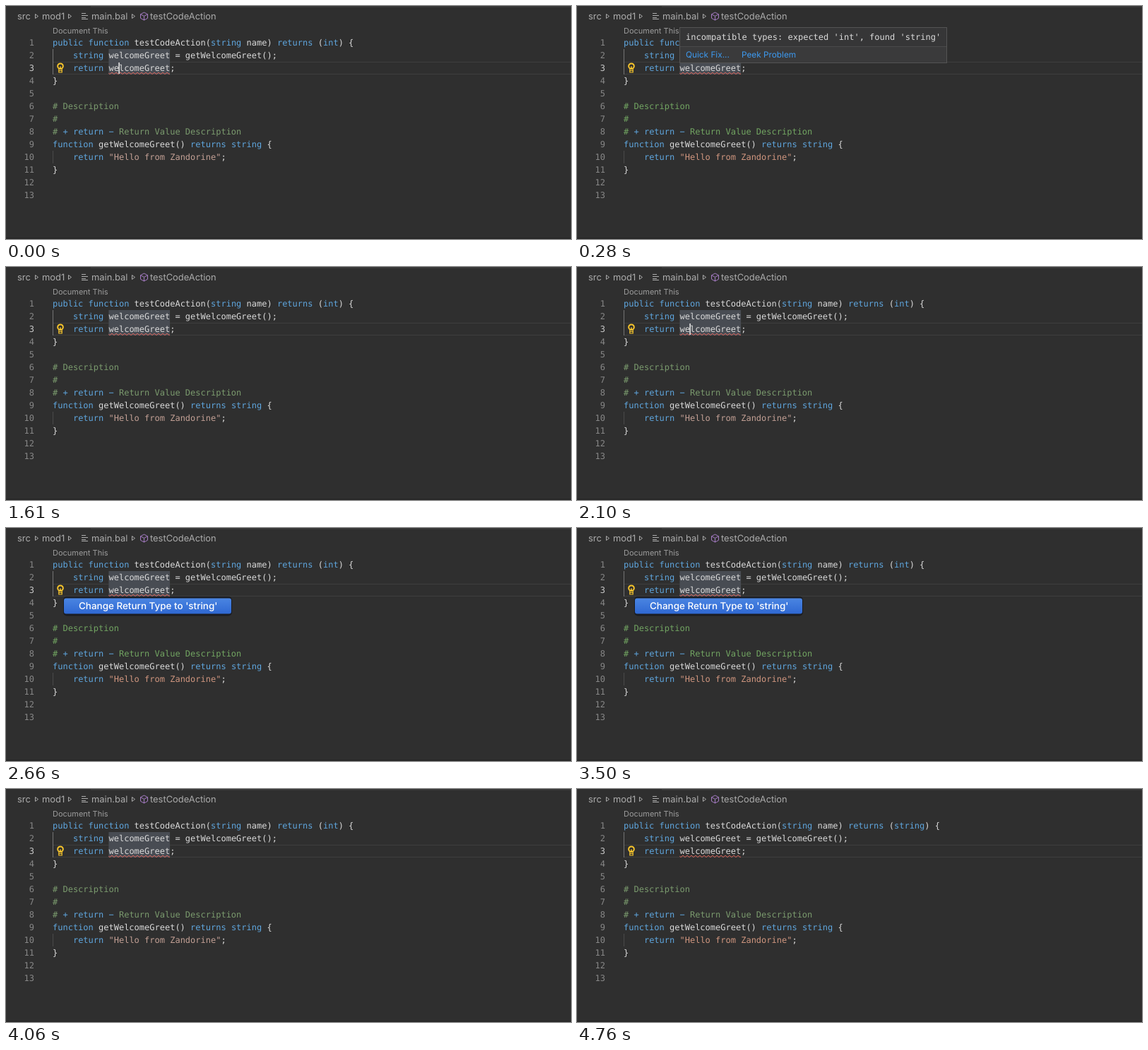
These frames come from a looping animation (800x330 px, 4.83 s). An HTML page:

```html
<!DOCTYPE html>
<html lang="en">
<head>
<meta charset="utf-8">
<title>Code action</title>
<style>
  html, body { margin: 0; width: 800px; height: 330px; overflow: hidden; background: #2f2f2f; }
  svg { display: block; }
  text { white-space: pre; text-rendering: geometricPrecision; }
  .code { font: 12px "DejaVu Sans Mono", monospace; fill: #dadada; }
  .num { font: 12px "DejaVu Sans Mono", monospace; fill: #878787; text-anchor: end; }
  .num.active { fill: #cacaca; }
  .ui { font-family: Inter, sans-serif; fill: #acacac; }
  .crumb { font-size: 12.9px; }
  .lens { font-size: 11px; fill: #9c9c9c; }
  .link { font-size: 11.8px; fill: #3d9af0; }
  .item { font-size: 13.45px; font-weight: 500; fill: #fff; }
  .key { fill: #5fa6de; }
  .str { fill: var(--str); }
  .note { fill: var(--note); }
  .line { fill: none; stroke: #acacac; }
</style>
</head>
<body>
<svg id="stage" width="800" height="330" viewBox="0 0 800 330">
  <linearGradient id="blue" x2="0" y2="1">
    <stop stop-color="#4a85e2"/>
    <stop offset="1" stop-color="#2f68d2"/>
  </linearGradient>
  <rect width="800" height="330" fill="#2f2f2f"/>
  <path d="M120 0H800V2H120Z" fill="#383838"/>
  <path d="M0 328H800V330H0Z" fill="#282828"/>

  <g class="ui crumb">
    <text x="16" y="19">src</text>
    <text x="51" y="19">mod1</text>
    <text x="121" y="19">main.bal</text>
    <text x="204" y="19">testCodeAction</text>
  </g>
  <path class="line" d="M41.5 11.5l4 3l-4 3zM88.5 11.5l4 3l-4 3zM178.5 11.5l4 3l-4 3z"/>
  <path class="line" d="M107 10.5h6M107 13.5h9M107 16.5h6M107 18.5h9"/>
  <path class="line" style="stroke:#a67cc4" d="M195.5 9l5 2.7v5.6l-5 2.7l-5-2.7v-5.6zM190.5 11.7l5 2.6l5-2.6M195.5 14.3v5.7"/>
  <text class="ui lens" x="66" y="39">Document This</text>

  <rect x="66.5" y="79.5" width="740" height="17" fill="none" stroke="#3e3e3e"/>
  <path d="M66.5 61V97" stroke="#747474"/>
  <path d="M66.5 205V223" stroke="#4a4a4a"/>
  <rect id="marks" x="145.4" y="61" width="86.7" height="36" fill="#484c53"/>
  <g id="lines"></g>
  <path id="squiggle" fill="none" stroke="#e0685e"/>

  <g id="bulb" fill="none" stroke="#f8c62c">
    <circle cx="77" cy="85.2" r="3.8" stroke-width="2"/>
    <path d="M77 85.5V90" stroke-width="1.6"/>
    <path d="M74.8 89V94H79.2V89M75 91.5H79" stroke-width="1.2"/>
  </g>
  <rect id="caret" x="159.3" y="80" width="1.6" height="16" fill="#e4e4e4"/>

  <g id="hover">
    <rect x="145.5" y="30.5" width="378" height="50" fill="#363637" stroke="#545454"/>
    <path d="M146 58H523V80H146Z" fill="#3a3a3b"/>
    <path d="M146 57.5H523" stroke="#4a4a4a"/>
    <text class="code" x="154" y="48">incompatible types: expected 'int', found 'string'</text>
    <text class="ui link" x="154" y="73">Quick Fix...</text>
    <text class="ui link" x="233" y="73">Peek Problem</text>
  </g>

  <g id="menu">
    <rect x="81" y="97" width="239" height="27.5" rx="5" fill="#1b1d22"/>
    <rect x="82" y="99.5" width="237" height="22" rx="3" fill="url(#blue)"/>
    <text class="ui item" x="103" y="115">Change Return Type to 'string'</text>
  </g>
</svg>
<script>
const LOOP = 4830, HOVER_IN = 70, HOVER_OUT = 1540, MENU_IN = 2380, MENU_OUT = 3920, EDIT = 4200;
const $ = id => document.getElementById(id);

const source = [
  'public function testCodeAction(string name) returns (int) {',
  '    string welcomeGreet = getWelcomeGreet();',
  '    return welcomeGreet;',
  '}',
  '',
  '# Description',
  '#',
  '# + return − Return Value Description',
  'function getWelcomeGreet() returns string {',
  '    return "Hello from Zandorine";',
  '}',
  '',
  ''
];

const span = (name, text) => `<tspan class="${name}">${text}</tspan>`;

function highlight(line) {
  if (line.startsWith('#'))
    return span('note', line.replace('+ return −', m => span('key', m)));
  return line.replace(/"[^"]*"|\b(public|function|string|returns?|int)\b/g,
    m => span(m[0] === '"' ? 'str' : 'key', m));
}

$('lines').innerHTML = source.map((line, i) => {
  const y = 56 + 18 * i;
  return `<text class="num${i === 2 ? ' active' : ''}" x="40" y="${y}">${i + 1}</text>` +
    `<text class="code" x="66" y="${y}">${highlight(line)}</text>`;
}).join('');
const firstLine = $('lines').querySelector('.code');
const signatures = [source[0], source[0].replace('int)', 'string)')].map(highlight);

$('squiggle').setAttribute('d', 'M145.3 95.2l1.7 1.4' + 'l3 -2.4l3 2.4'.repeat(14) + 'l1 -.8');

const within = (t, from, to) => t >= from && t < to;
const fade = (t, from, to) => Math.max(0, Math.min(1, (t - from) / (to - from)));
const show = (id, opacity) => $(id).setAttribute('opacity', +opacity);

let shown = -1;
function draw(t) {
  const edited = +(t >= EDIT);
  if (edited !== shown) firstLine.innerHTML = signatures[shown = edited];

  const hover = fade(t, HOVER_IN, HOVER_IN + 100) * (t < HOVER_OUT);
  const menu = (t >= MENU_IN) * (1 - fade(t, MENU_OUT, MENU_OUT + 120));
  show('hover', hover);
  show('menu', menu);
  show('marks', !edited);
  show('caret', t < 210 || within(t, 700, 1260) || within(t, 1750, 2240) || within(t, EDIT, 4760));

  // Colours are a little stronger while a popup is open.
  const vivid = hover + menu > 0.5;
  $('stage').style.setProperty('--note', vivid ? '#72a562' : '#7b9b6e');
  $('stage').style.setProperty('--str', vivid || edited ? '#d0967f' : '#c3a095');
}

function tick() {
  draw(performance.now() % LOOP);
  requestAnimationFrame(tick);
}
tick();
</script>
</body>
</html>
```
